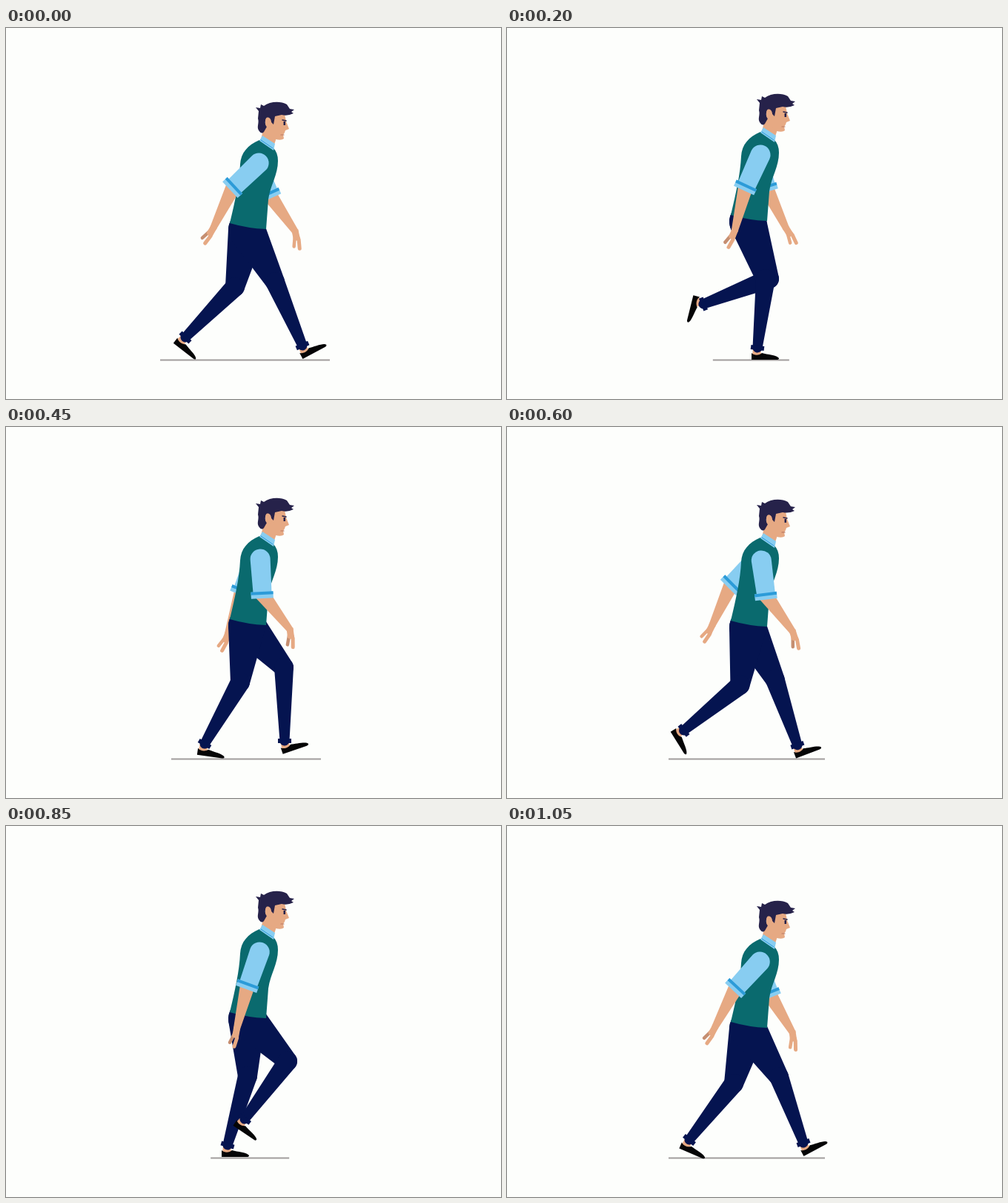
An HTML page with a canvas for the animation above (1.1 s loop, 668 px wide and 500 px high).

```html
<!DOCTYPE html>
<html lang="en">
<head>
<meta charset="utf-8">
<title>Walk cycle</title>
<style>
html, body { margin: 0; width: 100%; height: 100%; overflow: hidden; background: #fdfefc; }
canvas { display: block; }
</style>
</head>
<body>
<canvas id="stage" width="668" height="500"></canvas>
<script>
const ctx = document.getElementById('stage').getContext('2d');
const LOOP = 1100, STEP = 50, HALF = LOOP / 2;
const NAVY = '#051450', SKIN = '#e6a983', SHADE = '#c58e70', TEAL = '#0a6a6e',
  SKY = '#88cdf1', BLUE = '#2c9bd8', HAIR = '#26224a', SHOE = '#050506';

// phase since heel strike, knee x y, ankle x y, foot angle
const LEG = [
  [0, 363, 342, 400, 428, -28],
  [150, 359, 335, 355, 430, 0],
  [200, 349, 338, 338, 431, 0],
  [300, 326, 337, 299, 430, 0],
  [350, 326, 339, 299, 431, 1],
  [450, 316, 344, 268, 427, 8],
  [500, 306, 347, 246, 423, 23],
  [550, 309, 349, 242, 417, 38],
  [620, 317, 347, 238, 406, 66],
  [700, 328, 343, 249, 397, 94],
  [750, 354, 338, 265, 372, 104],
  [850, 380, 317, 322, 395, 34],
  [900, 381, 315, 342, 402, 25],
  [1000, 375, 324, 376, 423, -19],
  [1050, 367, 338, 400, 427, -28]
];
// time, upper arm, forearm and hand angles (positive swings back)
const NEAR_ARM = [
  [0, 47, 26, 33], [200, 25, 14, 25], [350, -1, -24, 2], [450, -3, -38, -5],
  [550, -8, -39, -10], [700, -2, -23, -24], [850, 20, 14, 13], [1050, 43, 28, 31]
];
const FAR_ARM = [
  [0, -24, -35, -10], [200, -17, -26, -30], [350, 4, 0, 0], [450, 22, 18, 24],
  [550, 44, 26, 30], [700, 46, 20, 27], [850, 10, 3, 5], [1050, -22, -31, -6]
];
// half-cycle phase, body offset, half width of the ground line
const BODY = [
  [0, 0, 114.5], [150, -8, 66.5], [200, -11, 51.5], [300, -12, 53],
  [350, -12, 72], [450, -4, 101], [500, 1, 105.5]
];

// Smooth periodic interpolation without overshoot
function sample(keys, time, period) {
  const n = keys.length;
  time = (time % period + period) % period;
  let i = n - 1;
  while (keys[i][0] > time) i--;
  const at = (k, c) => {
    const turn = Math.floor(k / n);
    return keys[k - turn * n][c] + (c ? 0 : turn * period);
  };
  const slope = (k, c) => (at(k + 1, c) - at(k, c)) / (at(k + 1, 0) - at(k, 0));
  const tangent = (k, c) => {
    const a = slope(k - 1, c), b = slope(k, c);
    return a * b > 0 ? 2 * a * b / (a + b) : 0;
  };
  const span = at(i + 1, 0) - at(i, 0), u = (time - at(i, 0)) / span;
  return keys[0].slice(1).map((_, k) => {
    const c = k + 1, p = at(i, c), q = at(i + 1, c);
    return p + (q - p) * u * u * (3 - 2 * u) +
      span * u * (1 - u) * (tangent(i, c) * (1 - u) - tangent(i + 1, c) * u);
  });
}

function fill(path, color) {
  ctx.fillStyle = color;
  ctx.fill(new Path2D(path));
}

function line(path, color, width) {
  ctx.strokeStyle = color;
  ctx.lineWidth = width;
  ctx.stroke(new Path2D(path));
}

function placed(x, y, degrees, draw) {
  ctx.save();
  ctx.translate(x, y);
  ctx.rotate(degrees * Math.PI / 180);
  draw();
  ctx.restore();
}

// Tapered limb between two circles
function limb(x1, y1, r1, x2, y2, r2, color) {
  const dx = x2 - x1, dy = y2 - y1, a = Math.atan2(dy, dx);
  const b = Math.acos((r1 - r2) / Math.hypot(dx, dy));
  ctx.fillStyle = color;
  ctx.beginPath();
  ctx.arc(x1, y1, r1, a + b, a - b + 2 * Math.PI);
  ctx.arc(x2, y2, r2, a - b, a + b);
  ctx.fill();
}

function leg(phase, bob) {
  const [kx, ky, ax, ay, foot] = sample(LEG, phase, LOOP);
  const shin = Math.atan2(ay - ky, ax - kx) * 180 / Math.PI - 90;
  placed(ax, ay, foot, () => {
    fill('M-6 0H4L5 11H-7Z', SKIN);
    fill('M-8 7C-4 11 3 10 6 7C13 9 27 10 29 14Q29 16 26 16H-8Z', SHOE);
  });
  limb(325, 272 + bob, 25, kx, ky, 13, NAVY);
  limb(kx, ky, 13, ax, ay, 6.5, NAVY);
  placed(ax, ay, shin, () => fill('M-9-3H9V3H-9Z', NAVY));
}

function arm(x, y, [upper, fore, hand], thumb) {
  const reach = (px, py, angle, size) => {
    const r = angle * Math.PI / 180;
    return [px - Math.sin(r) * size, py + Math.cos(r) * size];
  };
  const [ex, ey] = reach(x, y, upper, 47);
  const [wx, wy] = reach(ex, ey, fore, 61);
  placed(wx, wy, hand, () => {
    line('M-1 5L-5 20', thumb, 4.5);
    line('M1 3L3 12L2 24', SKIN, 5);
    fill('M-4.500-2H4.500L5 10Q1 15-4 11Z', SKIN);
  });
  limb(ex, ey, 10, wx, wy, 4.5, SKIN);
  placed(x, y, upper, () => {
    fill('M-13.500 0A13.500 13.500 0 0 1 13.500 0L13 45H-12Z', SKY);
    fill('M-15 44H15V53H-15Z', SKY);
    fill('M-15 44H15V48H-15Z', BLUE);
  });
}

function torso() {
  fill('M349 130L366 139L364 151L361 160L344 150Z', SKIN);
  fill('M342 151C326 158 317 168 316 184C315 207 309 234 302 263Q326 270 351 271L354 231C357 211 367 198 367 179Q367 168 361 162Z', TEAL);
  fill('M346 145L363 156L361 165L342 152Z', SKY);
  line('M344 151L360 162', BLUE, 1);
}

function head() {
  fill('M355 114L376 116L378 126L382 136L377 138L376 141L374 144L375 149Q372 152 364 150L350 140V122Z', SKIN);
  fill('M341 112L337 107L343 108L344 103L348 105C356 99 370 98 379 103L383 109L389 110L385 113L388 115Q380 119 372 117L363 119L361 130L358 127C358 120 351 118 350 125Q349 130 352 133L348 140Q345 144 341 138C338 133 342 128 340 122Z', HAIR);
  fill('M350 125Q351 118 356 122L359 130Q356 138 351 132Z', SKIN);
  line('M373 124L378 125', HAIR, 1.5);
  fill('M374.500 126H377V131H374.500Z', HAIR);
  line('M371 144L375 144', '#b97862', 1.2);
}

function draw(time) {
  const [bob, half] = sample(BODY, time, HALF);
  ctx.fillStyle = '#fdfefc';
  ctx.fillRect(0, 0, 668, 500);
  const mid = 334.9 - half * 0.108;
  ctx.lineCap = 'butt';
  line(`M${mid - half} 447.500H${mid + half}`, '#a19d9d', 2.2);
  ctx.lineCap = ctx.lineJoin = 'round';
  arm(336, 181 + bob, sample(FAR_ARM, time, LOOP), SKIN);
  leg(time + HALF, bob);
  leg(time, bob);
  placed(0, bob, 0, () => {
    torso();
    head();
  });
  const near = sample(NEAR_ARM, time, LOOP);
  arm(343 - near[0] / 25, 182 + bob, near, SHADE);
}

const start = performance.now();
function tick() {
  const time = (performance.now() - start) % LOOP;
  draw(Math.floor(time / STEP) * STEP);
  requestAnimationFrame(tick);
}
tick();
</script>
</body>
</html>
```
